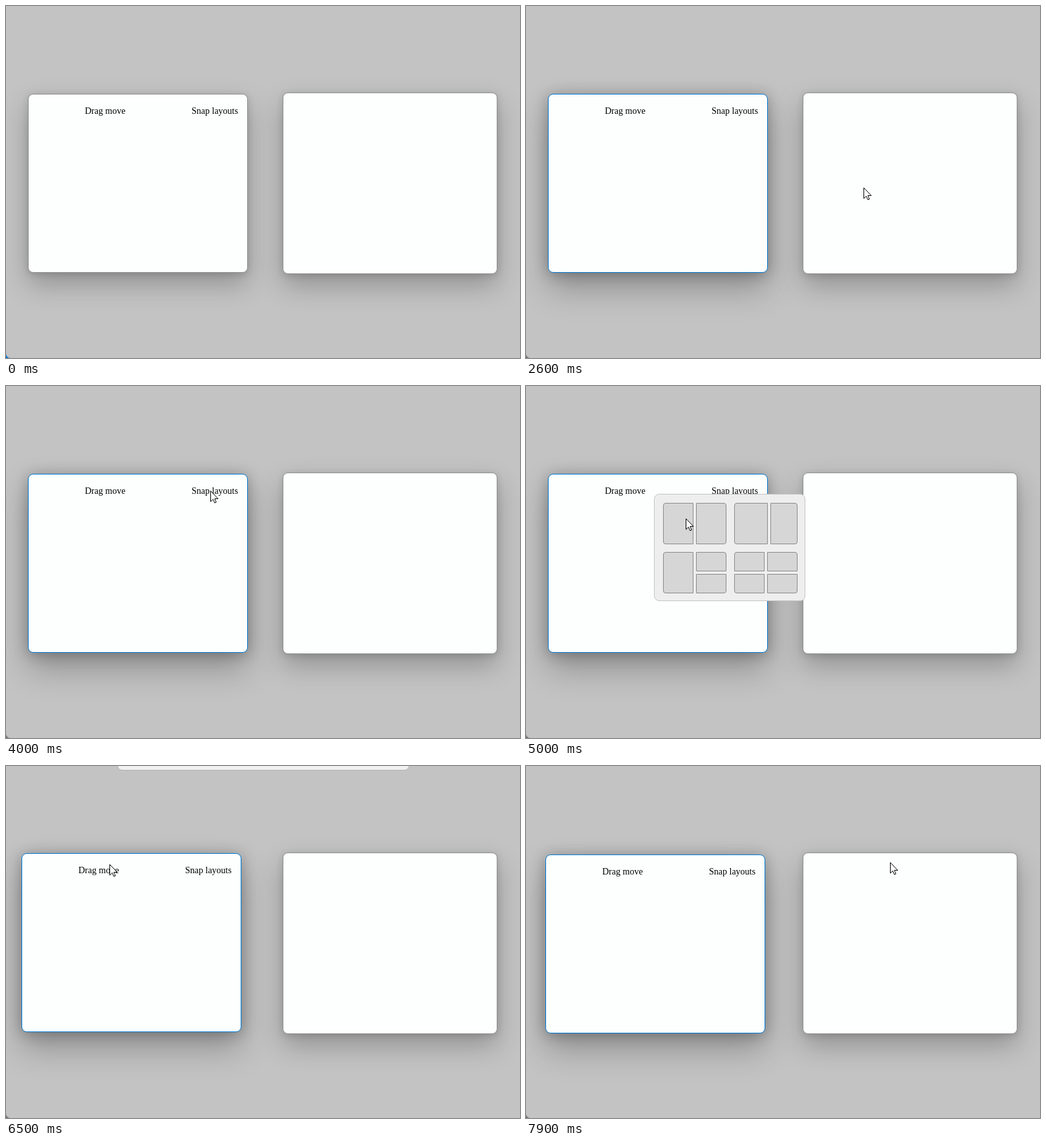
Animation, 795 px wide and 545 px high, one loop 8 s. Source, as an HTML page:

```html
<!DOCTYPE html>
<html lang="en">
<head>
<meta charset="utf-8">
<title>Two windows</title>
<style>
  html, body { margin: 0; width: 100%; height: 100%; overflow: hidden; background: #c3c3c3; }
  #stage { position: relative; width: 795px; height: 545px; overflow: hidden; }
  #stage * { position: absolute; box-sizing: border-box; }
  .window {
    background: #fdfefe; border: 1px solid #8d8f91; border-radius: 8px;
    box-shadow: 0 18px 40px rgba(0,0,0,.25), 0 2px 11px rgba(0,0,0,.14);
  }
  .window.active { box-shadow: 0 24px 50px rgba(0,0,0,.27), 0 2px 21px rgba(0,0,0,.27); }
  #left { left: 34px; top: 136px; width: 340px; height: 277px; }
  #left.active { border-color: #0078d4; }
  #right { left: 428px; top: 134px; width: 332px; height: 281px; }
  .window span { top: 16px; font: 14px/20px "Liberation Serif", serif; color: #000; white-space: nowrap; }
  #popup {
    left: 198px; top: 167px; width: 234px; height: 166px;
    background: #eee; border: 1px solid #c4c4c4; border-radius: 8px;
  }
  #popup i { background: #d6d6d6; border: 1px solid #8a8a8a; }
  #bar {
    left: 172px; top: -40px; width: 452px; height: 47px;
    background: #f0f0f0; border: 1px solid #b2b2b2; border-radius: 8px;
  }
  svg { left: 0; top: 0; }
</style>
</head>
<body>
<div id="stage">
  <div id="right" class="window"></div>
  <div id="left" class="window">
    <span style="left:87px">Drag move</span>
    <span style="left:252px">Snap layouts</span>
  </div>
  <div id="popup"></div>
  <div id="bar"></div>
  <svg width="795" height="545">
    <path id="corner" d="M0 539Q1 544 6 545H0Z"/>
    <path id="cursor" d="M.5 .5V17L4.3 13.4 6.8 19 9.2 18 6.8 12.5H12Z" fill="#fff" stroke="#000"/>
  </svg>
</div>
<script>
const LOOP = 8000, STEP = 100;
const $ = id => document.getElementById(id);

// Each layout: width of its left column, rows on the left, rows on the right
const GAP = 4, LAYOUT_WIDTH = 98, LAYOUT_HEIGHT = 64;
[[47, 1, 1], [52, 1, 1], [47, 1, 2], [47, 2, 2]].forEach(([split, ...rows], n) => {
  const left = 13 + n % 2 * 110, top = 13 + (n >> 1) * 76;
  rows.forEach((count, side) => {
    const width = side ? LAYOUT_WIDTH - split - GAP : split;
    const height = (LAYOUT_HEIGHT + GAP) / count - GAP;
    for (let row = 0; row < count; row++) {
      const cell = document.createElement('i');
      const edge = side ? 'right' : 'left';
      Object.assign(cell.style, {
        left: left + side * (split + GAP) + 'px',
        top: top + row * (height + GAP) + 'px',
        width: width + 'px',
        height: height + 'px'
      });
      if (row === 0) cell.style.setProperty(`border-top-${edge}-radius`, '4px');
      if (row === count - 1) cell.style.setProperty(`border-bottom-${edge}-radius`, '4px');
      $('popup').append(cell);
    }
  });
});

// Smooth moves: start time, end time, x, y
const pointerMoves = [
  [100, 500, 535, 221],
  [1200, 1600, 179, 257],
  [2000, 2600, 522, 281],
  [2900, 3500, 252, 253],
  [3700, 4000, 316, 162],
  [4600, 5000, 247, 205],
  [5000, 5300, 145, 331],
  [5300, 5800, 174, 267],
  [5800, 6200, 170, 153],
  [7300, 7900, 567, 148]
];
const dragMoves = [[6200, 6500, -10, -1], [6500, 6800, 355, 30], [6800, 7100, -4, 1]];
const clicks = [[600, 'right'], [1800, 'left'], [2800, 'right'], [3600, 'left']];

function ease(t, start, end) {
  const k = Math.min(1, Math.max(0, (t - start) / (end - start)));
  return k * k * (3 - 2 * k);
}

function position(moves, t, x, y) {
  for (const [start, end, toX, toY] of moves) {
    const k = ease(t, start, end);
    x += (toX - x) * k;
    y += (toY - y) * k;
  }
  return [Math.round(x), Math.round(y)];
}

function draw() {
  const t = Math.floor(performance.now() % LOOP / STEP) * STEP;

  const focus = clicks.findLast(([time]) => time <= t)?.[1];
  for (const id of ['left', 'right']) $(id).classList.toggle('active', focus === id);
  $('corner').style.fill = focus ? '#777' : '#0078d4';

  const [dx, dy] = position(dragMoves, t, 0, 0);
  $('left').style.transform = `translate(${dx}px,${dy}px)`;

  const [x, y] = position(pointerMoves, t, 560, 25);
  $('cursor').style.display = t < 100 ? 'none' : '';
  $('cursor').setAttribute('transform', `translate(${x + dx},${y + dy})`);

  const shown = ease(t, 4400, 4700);
  $('popup').style.opacity = shown - ease(t, 5300, 5500);
  $('popup').style.transform = `translateY(${12 * (shown - 1)}px)`;

  $('bar').style.display = t >= 6300 && t < 7400 ? '' : 'none';
  requestAnimationFrame(draw);
}
draw();
</script>
</body>
</html>
```
